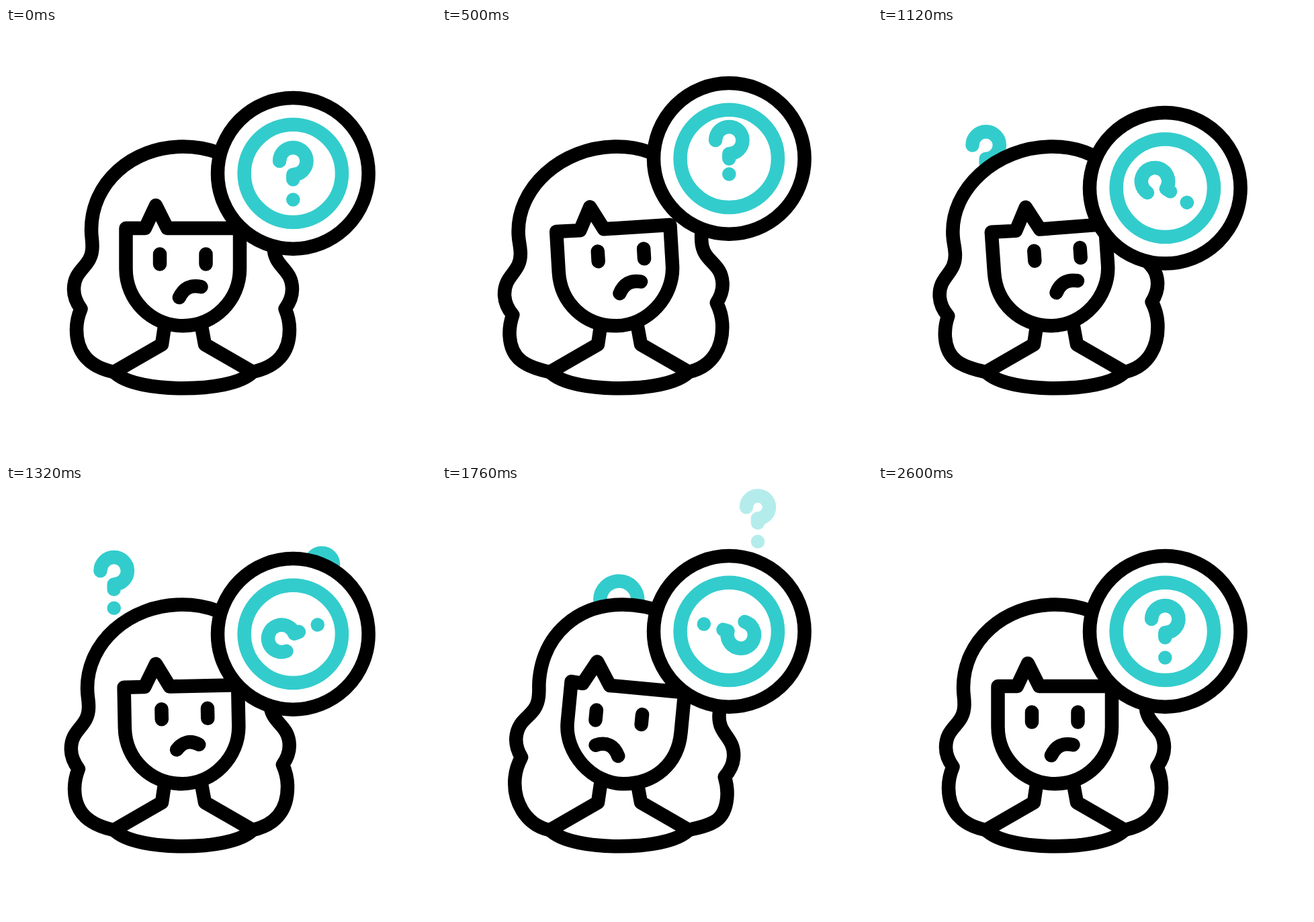
An HTML page that plays this animation: 640x640 px, repeating every 3000 ms.

```html
<!DOCTYPE html>
<html lang="en">
<head>
<meta charset="utf-8">
<title>Puzzled</title>
<style>
html, body { margin: 0; width: 100%; height: 100%; overflow: hidden; background: #fff; }
svg { display: block; width: 100vw; height: 100vh; }
.ink { fill: none; stroke: #000; stroke-width: 20.5; stroke-linecap: round; stroke-linejoin: round; }
.solid { fill: #fff; }
.teal { stroke: #33cccc; }
</style>
</head>
<body>
<svg viewBox="0 0 640 640">
  <g id="marks"></g>
  <g class="ink">
    <path id="hair" class="solid"/>
    <path d="M236 444L232 471L161 512M291 444L296 471L367 512"/>
    <path d="M161 512C178 530 225 536.300 264 536.300S350 530 367 512"/>
    <path id="face" class="solid"/>
    <g id="features">
      <path d="M-34.250 -7.500v15M34.250 -7.500v15"/>
      <path id="mouth"/>
    </g>
  </g>
  <g id="bubble" class="ink">
    <circle class="solid" r="112.300"/>
    <circle class="teal" r="72.700"/>
    <g id="spinner" class="teal">
      <path id="hook"/>
      <path id="dot" d="M0 39h.01"/>
    </g>
  </g>
</svg>
<script>
const LOOP = 3000;
const RISE = { height: 160, time: 950, fade: 190 };
const $ = id => document.getElementById(id);
const set = (el, name, value) => el.setAttribute(name, value);
const mix = (a, b, k) => a + (b - a) * k;
const mid = (p, q, k) => [mix(p[0], q[0], k), mix(p[1], q[1], k)];
const part = (t, from, to) => Math.min(1, Math.max(0, (t - from) / (to - from)));
const ease = (t, from, to) => {
  const x = part(t, from, to);
  return x * x * (3 - 2 * x);
};
const text = (...pts) => pts.map(p => p.map(n => n.toFixed(2)).join(" ")).join(" ");

function turn([x, y], [cx, cy], deg) {
  const a = deg * Math.PI / 180, c = Math.cos(a), s = Math.sin(a);
  return [cx + (x - cx) * c - (y - cy) * s, cy + (x - cx) * s + (y - cy) * c];
}

// Question mark: three quarters of a ring and a stem
const hook = r => `M${-r} 0A${r} ${r} 0 1 1 0 ${r}V${1.36 * r}`;
set($("hook"), "d", hook(20.2));

// Marks that rise from behind the head: final height, arrival and start of fading
const marks = [
  { x: 160.7, r: 20.2, y: 90, end: 1614, fade: 1500 },
  { x: 470, r: 17, y: 29.5, end: 1825, fade: 1640 },
  { x: 263.3, r: 28, y: 50.5, end: 2397, fade: 2290 }
];
for (const m of marks) {
  m.el = document.createElementNS("http://www.w3.org/2000/svg", "g");
  set(m.el, "class", "ink teal");
  m.el.innerHTML = `<path d="${hook(m.r)}M0 ${27.3 + 1.4 * m.r}h.01"/>`;
  $("marks").append(m.el);
}

// Half of the hair outline, from the shoulder up to the crown
function halfHair() {
  const end = [160, 512], lobe = [105, 449], notch = [111.5, 418], curl = [101, 389];
  const waist = [128.5, 325], temple = [127, 300], crown = [263.5, 176.5];
  const level = (p, q) => (p[1] + q[1]) / 2;
  const bend = (p, c, q) => [mid(p, c, 2 / 3), mid(q, c, 2 / 3), q];
  const wave = (p, q) => [[p[0], level(p, q)], [q[0], level(p, q)], q];
  return [
    end,
    ...bend(end, [lobe[0], 500], lobe),
    ...bend(lobe, [lobe[0], level(lobe, notch)], notch),
    ...bend(notch, [curl[0], level(notch, curl)], curl),
    ...wave(curl, waist),
    ...wave(waist, temple),
    mid(temple, [temple[0], crown[1]], 0.56), mid(crown, [temple[0], crown[1]], 0.56), crown
  ];
}
const half = halfHair();
const hair = half.concat(half.slice(0, -1).reverse().map(([x, y]) => [527 - x, y]));

// Shoulders stay put and the crown slides; the rest turns with the head
function drawHair(deg, left, right) {
  const top = half.length - 1;
  const pts = hair.map((p, i) => {
    const k = Math.min(i, hair.length - 1 - i);
    if (k < 2) return p;
    if (k >= top - 1) return [p[0] + deg * (k === top ? 0.9 : 3), p[1]];
    const [x, y] = turn(p, [263, 490], deg);
    return [x - 2.6 * left - right, y];
  });
  set($("hair"), "d", `M${text(pts[0])}C${text(...pts.slice(1))}`);
}

function drawFace(deg, left, right) {
  const slide = 9 * (left - right);
  const spread = 2 * left + 5 * right;
  const at = (x, y, dx = 0) => {
    const p = turn([x, y], [258, 441], deg);
    return [p[0] + dx, p[1]];
  };
  const chin = x => [263.3 + 1.2 * deg + x, 443.2];
  const jaw = text(at(178.5, 358.3), at(178.5, 405), chin(-46.8), chin(0),
    chin(46.8), at(348, 405), at(348, 358.3));
  const fringe = text(at(348, 298), at(240, 298, slide + spread), at(223, 264, slide),
    at(207, 298, slide - spread / 2), at(178.5, 298));
  set($("face"), "d", `M${jaw.replace(/^(\S+ \S+)/, "$1C")}L${fringe}Z`);
}

function drawFeatures(deg, left, right) {
  const x = 263.25 + 3.75 * left, y = 344 - 7.2 * left + 0.3 * right;
  set($("features"), "transform", `translate(${x} ${y}) rotate(${deg})`);
  const from = mid([-5.3, 57], [-30.5, 44.5], right);
  const bow = mid([4.8, 36], [-7, 34.5], right);
  const to = mid([27.2, 41.3], [4.5, 57.5], right);
  set($("mouth"), "d", `M${text(from)}Q${text(bow, to)}`);
}

function drawBubble(t) {
  const bob = 52 * ease(t, 600, 1020) - 26 * (ease(t, 200, 600) + ease(t, 1020, 1420));
  const hop = ease(t, 200, 500) - ease(t, 500, 800);
  // Turns past a full circle, then settles back
  const spin = 51 * ease(t, 2280, 2600) - 411 * ease(t, 690, 2540);
  set($("bubble"), "transform", `translate(427.3 ${216.4 + bob})`);
  set($("spinner"), "transform", `rotate(${spin})`);
  set($("hook"), "transform", `translate(0 ${-18.3 - 9 * hop})`);
  set($("dot"), "transform", `translate(0 ${-16 * hop})`);
}

function drawMark(m, t) {
  const y = m.y + RISE.height * (1 - ease(t, m.end - RISE.time, m.end));
  set(m.el, "transform", `translate(${m.x} ${y})`);
  set(m.el, "opacity", t < m.end - RISE.time ? 0 : 1 - part(t, m.fade, m.fade + RISE.fade));
}

function draw(t) {
  // Share of the left-leaning and right-leaning poses
  const swing = ease(t, 1100, 1710);
  const left = ease(t, 200, 600) - swing;
  const right = swing - ease(t, 2200, 2600);
  const deg = 5.5 * right - 4 * left;
  drawHair(deg, left, right);
  drawFace(deg, left, right);
  drawFeatures(deg, left, right);
  drawBubble(t);
  marks.forEach(m => drawMark(m, t));
}

const start = performance.now();
function tick() {
  draw((performance.now() - start) % LOOP);
  requestAnimationFrame(tick);
}
tick();
</script>
</body>
</html>
```
